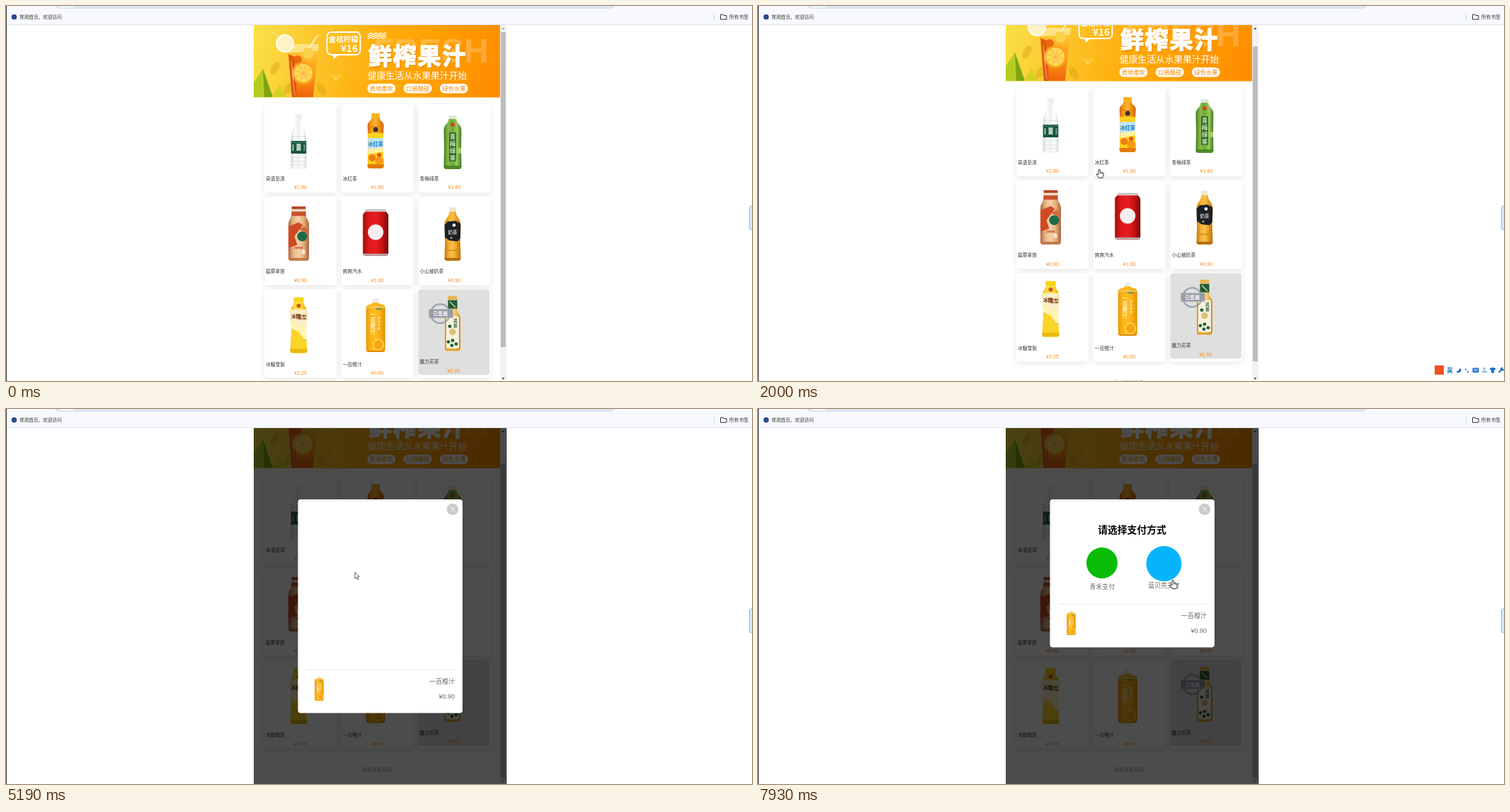
An HTML page with a canvas for the animation above (8000 ms loop, 1054 px wide and 531 px high).

```html
<!DOCTYPE html>
<html lang="zh">
<head>
<meta charset="utf-8">
<title>Drinks shop</title>
<style>
html, body { margin: 0; width: 100%; height: 100%; overflow: hidden; background: #fff; }
canvas { display: block; width: 1054px; height: 531px; }
</style>
</head>
<body>
<canvas id="c"></canvas>
<script>
const W = 1054, H = 531, LOOP = 8000;
const CJK = '"Noto Sans CJK SC", "Noto Sans CJK", sans-serif';
const LATIN = '"Liberation Sans", Arial, sans-serif';
const cv = document.getElementById('c'), g = cv.getContext('2d');
const dpr = window.devicePixelRatio || 1;
cv.width = W * dpr;
cv.height = H * dpr;

// ---- helpers
function rect(x, y, w, h, color, r = 0) {
  g.fillStyle = color;
  g.beginPath();
  g.roundRect(x, y, w, h, r);
  g.fill();
}
function disc(x, y, r, color) {
  g.fillStyle = color;
  g.beginPath();
  g.arc(x, y, r, 0, 7);
  g.fill();
}
function poly(points, fill, stroke, lw = 1) {
  g.beginPath();
  for (let i = 0; i < points.length; i += 2) g.lineTo(points[i], points[i + 1]);
  g.closePath();
  if (fill) { g.fillStyle = fill; g.fill(); }
  if (stroke) { g.strokeStyle = stroke; g.lineWidth = lw; g.stroke(); }
}
function line(x1, y1, x2, y2, color, lw = 1) {
  g.strokeStyle = color;
  g.lineWidth = lw;
  g.beginPath();
  g.moveTo(x1, y1);
  g.lineTo(x2, y2);
  g.stroke();
}
function text(s, x, y, size, color, align = 'left', weight = 400, font = CJK) {
  g.font = `${weight} ${size}px ${font}`;
  g.textAlign = align;
  g.textBaseline = 'middle';
  g.fillStyle = color;
  g.fillText(s, x, y);
}
function column(s, x, y, size, color, step = size) {
  [...s].forEach((ch, i) => text(ch, x, y + i * step, size, color, 'center', 700));
}
function blend(x1, y1, x2, y2, colors) {
  const gr = g.createLinearGradient(x1, y1, x2, y2);
  colors.forEach((c, i) => gr.addColorStop(i / (colors.length - 1), c));
  return gr;
}
function track(keys, t) {
  if (t <= keys[0][0]) return keys[0].slice(1);
  for (let i = 1; i < keys.length; i++) {
    const a = keys[i - 1], b = keys[i];
    if (t < b[0]) {
      const u = (t - a[0]) / (b[0] - a[0]), e = u * u * (3 - 2 * u);
      return a.slice(1).map((v, k) => v + (b[k + 1] - v) * e);
    }
  }
  return keys[keys.length - 1].slice(1);
}

// ---- drinks, each drawn around x = 0 with y = 0 at the card top
// cw, ch: cap size; neck: straight part; sh: shoulder height; waist: inward bend of the sides
function bottle(o, art) {
  const { y, w, h, cw, ch, neck = 0, sh, waist = 0 } = o;
  const a = w / 2, n = cw / 2, cap = y + ch, top = cap + neck, end = y + h;
  const mid = (top + sh + end - 4) / 2, foot = Math.min(4, a / 2);
  g.save();
  g.beginPath();
  g.moveTo(-n, cap);
  g.lineTo(-n, top);
  g.bezierCurveTo(-n, top + sh * .4, -a, top + sh * .5, -a, top + sh);
  g.quadraticCurveTo(-a + waist * 2, mid, -a, end - foot);
  g.quadraticCurveTo(-a, end, -a + foot, end);
  g.lineTo(a - foot, end);
  g.quadraticCurveTo(a, end, a, end - foot);
  g.quadraticCurveTo(a - waist * 2, mid, a, top + sh);
  g.bezierCurveTo(a, top + sh * .5, n, top + sh * .4, n, top);
  g.lineTo(n, cap);
  g.closePath();
  g.fillStyle = blend(-a, 0, a, 0, o.fill);
  g.fill();
  g.clip();
  art(a, end);
  g.restore();
  rect(-n, y, cw, ch, o.cap, 1);
}
function water() {
  bottle({ y: 15, w: 22, h: 77, cw: 9, ch: 6, sh: 32, cap: '#eceeef',
    fill: ['#d4d8d9', '#fbfbfb', '#eff1f1', '#fff', '#d6d9da'] }, a => {
    rect(-a, 52, 22, 18, '#17573d');
    line(-a, 54, a, 54, '#4c8a6c');
    rect(-3, 56, 6, 10, '#b9cdc2');
    line(-8, 57, -8, 66, '#a4bfb1', 2);
    line(8, 57, 8, 66, '#6f9c87', 2);
    for (const y of [46, 75, 81, 86]) line(-a, y, a, y, '#dadddd');
  });
}
function icedTea() {
  bottle({ y: 13, w: 23, h: 78, cw: 12, ch: 7, sh: 10, waist: 1, cap: '#f7b01f',
    fill: ['#d26a08', '#f49d1e', '#fbb632', '#ee8e10', '#cc6506'] }, (a, end) => {
    line(-a, 32, a, 32, '#d97a0c');
    rect(-a, 41, 23, 50, '#ffd21f');
    rect(-a, 48, 23, 17, '#bfe4f4');
    disc(0, 36, 3.5, '#3b3422');
    text('冰红茶', 0, 56, 7.2, '#1277cc', 'center', 900);
    poly([-a, 64, a, 61, a, 67, -a, 71], '#fff2a0');
    disc(-5, 76, 5, '#f07b12');
    disc(5, 80, 6, '#f59a16');
    disc(5, 72, 3, '#e4571c');
    rect(-a, end - 6, 23, 6, '#e07a0a');
  });
}
function greenTea() {
  bottle({ y: 16, w: 25, h: 76, cw: 11, ch: 5, sh: 16, waist: .5, cap: '#dfe8d2',
    fill: ['#437f22', '#86bb49', '#6eaa3a', '#9bca5a', '#3d7620'] }, (a, end) => {
    disc(0, 29, 3, '#d2452c');
    rect(-5, 40, 10, 41, '#2e6b3b', 1);
    column('青梅绿茶', 0, 46, 8.2, '#d9eab4', 9.8);
    rect(-a, end - 5, 25, 5, '#4c8a26');
    disc(9, 66, 4, '#a8cf5e');
  });
}
function coffee() {
  bottle({ y: 13.5, w: 29, h: 77, cw: 20, ch: 4, neck: 7, sh: 15, cap: '#b5482a',
    fill: ['#b0683a', '#e9b98c', '#f4d0a8', '#e5ae7c', '#aa6236'] }, (a, end) => {
    rect(-a, 17, 29, 3, '#f3e6da');
    rect(-a, 21, 29, 6, '#c8502c');
    poly([-a, 42, 0, 36, 6, 40, -6, 56, -2, 68, -a, 72], '#cf4a22');
    poly([0, 46, 8, 42, a, 48, a, 52], '#d8663a');
    disc(5, 56, 7, '#1d6b49');
    text('latte', 0, 72, 6, '#c23e1c', 'center', 700, LATIN);
    rect(4, 75, 5, 6, '#f6e7d8');
    rect(-a, end - 4, 29, 4, '#c07a48');
  });
}
function can() {
  bottle({ y: 17.5, w: 36, h: 66, cw: 29, ch: 2, sh: 7, cap: '#bcbcbc',
    fill: ['#a80d0e', '#df191b', '#e61e1e', '#c81214', '#7d080a'] }, (a, end) => {
    rect(-a, 19, 36, 2, '#dcd4d2');
    disc(0, 50, 11, '#f8eeee');
    rect(-a, end - 3, 36, 3, '#b3acab');
  });
}
function milkTea() {
  bottle({ y: 14.5, w: 23, h: 76, cw: 9, ch: 6, sh: 20, waist: .8, cap: '#f0e6d2',
    fill: ['#c17a10', '#f2ae2d', '#f8c04a', '#e89c1c', '#b86f0a'] }, (a, end) => {
    poly([-a, 40, -7, 35, 4, 34, a, 38, a, 58, 7, 63, -4, 62, -a, 57], '#1b2127');
    disc(2, 40, 2.4, '#e8e8e2');
    text('奶茶', 0, 50, 6.5, '#c9c6ba', 'center', 700);
    disc(-2, 58, 1.5, '#c7a440');
    line(-a, 76, a, 76, '#d2881a', 1.5);
    rect(-a, end - 4, 23, 4, '#b56c0d');
  });
}
function pear() {
  bottle({ y: 11, w: 24, h: 79, cw: 14, ch: 7, sh: 14, waist: 1.5, cap: '#f6d512',
    fill: ['#e3b010', '#fcd92f', '#ffe450', '#f9ce1d', '#dfa80a'] }, (a, end) => {
    rect(-a, 28, 24, 26, '#f9efc4');
    disc(0, 23, 3, '#d4532a');
    text('冰糖', -4, 38, 6.5, '#6a2713', 'center', 900);
    text('雪梨', 5, 39, 6.5, '#8a3a18', 'center', 900);
    poly([-a, 46, a, 54, a, 72, -a, 60], '#fff3b4');
    poly([-a, 54, 0, 60, a, 76, a, end, -a, end], '#fbd42a');
    rect(-a, end - 6, 24, 6, '#eab90f');
  });
}
function orange() {
  bottle({ y: 12.5, w: 27, h: 76, cw: 8, ch: 6, sh: 6, cap: '#ecebe6',
    fill: ['#e89808', '#fdb416', '#ffbd24', '#fbab10', '#e49006'] }, (a, end) => {
    rect(-a, 24, 27, 2, '#f9cc62');
    rect(0, 26, 9, 3, '#8f9a48', 1);
    column('一百橙汁', -4, 36, 7.5, '#fff3cf', 8);
    column('鲜果鲜榨', 5, 40, 3.5, '#fff3cf', 5);
    disc(4, 78, 8, '#ffd557');
    disc(4, 78, 6.5, '#f9a412');
    rect(-a, end - 2, 27, 2, '#e08c06');
  });
}
function flowerTea() {
  bottle({ y: 9, w: 22, h: 78, cw: 13, ch: 5, neck: 15, sh: 12, cap: '#e8b64a',
    fill: ['#d0922a', '#f4cd6c', '#f9dc8c', '#eebe52', '#c98620'] }, (a, end) => {
    rect(-a, 15, 22, 12, '#215a3a');
    line(-4, 17, 4, 25, '#b5cfa5', 1.5);
    rect(-9, 38, 18, 45, '#f6f0da');
    column('花茶', 4, 44, 6, '#28573b', 7);
    disc(-4, 52, 2.4, '#1f5c3b');
    disc(0, 60, 4.5, '#d9c070');
    for (const [x, y] of [[-6, 74], [0, 72], [5, 77], [-1, 79]]) disc(x, y, 2.4, '#23603a');
    rect(-a, end - 3, 22, 3, '#dfa030');
  });
}

const GOODS = [
  ['泉语至清', '1.80', water], ['冰红茶', '1.80', icedTea], ['青梅绿茶', '1.80', greenTea],
  ['晨雾拿铁', '0.90', coffee], ['爽爽汽水', '1.80', can], ['小山坡奶茶', '0.90', milkTea],
  ['冰糖雪梨', '2.25', pear], ['一百橙汁', '0.90', orange], ['魔力花茶', '0.90', flowerTea]
];

// ---- page parts
function chrome() {
  rect(0, 0, W, H, '#fff');
  rect(0, 0, W, 27, '#f7f9fe');
  rect(69, -12, 791, 16, '#dfe6f1', 7);
  rect(75, -8, 22, 10, '#fafbfe', 4);
  line(0, 26.5, W, 26.5, '#dde2ea');
  line(.5, 0, .5, H, '#333');
  disc(11.5, 15.5, 3.8, '#2c4a8c');
  text('常用首页，欢迎访问', 19, 15.5, 6.67, '#333');
  line(1000.5, 11, 1000.5, 20, '#c5d3ea');
  poly([1009.5, 12, 1013, 12, 1014, 13.5, 1018, 13.5, 1018, 19, 1009.5, 19], null, '#333');
  text('所有书签', 1022, 15.5, 6.75, '#333');
  rect(1050.5, 283, 10, 34, '#d7e9fd', 3);
  g.strokeStyle = '#7db4ee';
  g.lineWidth = 1;
  g.stroke();
}

function title(x, y, color) {
  g.letterSpacing = '1.8px';
  g.lineJoin = 'miter';
  g.strokeStyle = color;
  g.lineWidth = 1.4;
  text('鲜榨果汁', x, y, 33, color, 'left', 900);
  g.strokeText('鲜榨果汁', x, y);
  g.letterSpacing = '0px';
}

function banner() {
  g.save();
  g.beginPath();
  g.rect(350, 27, 348, 102.5);
  g.clip();
  rect(350, 27, 348, 103, blend(350, 30, 698, 110, ['#f8e24a', '#fcc62a', '#ffae0c', '#ff9d00', '#ff8c00']));
  poly([350, 129, 350, 108, 363, 89, 377, 129], '#b4cc22');
  poly([363, 89, 377, 129, 365, 129], '#7fa312');
  poly([375, 129, 386, 111, 396, 129], '#d8cf22');
  g.fillStyle = 'rgba(214,160,20,.45)';
  for (const [x, y, r] of [[399, 117, .6], [446, 118, -.6], [380, 88, .5]]) {
    g.beginPath();
    g.ellipse(x, y, 5, 10, r, 0, 7);
    g.fill();
  }
  for (const x of [460, 466, 472])
    line(466, 106, x, 97, '#ffdc7a', 1.2);
  line(374, 35, 388, 45, '#fff0a0', 1);
  // glass of juice
  line(419, 72, 441, 41, '#f7f0d0', 2);
  poly([398, 54, 442, 54, 434, 129, 404, 129], 'rgba(255,244,190,.6)');
  poly([399, 66, 441, 64, 434, 129, 404, 129], blend(0, 64, 0, 129, ['#ffc636', '#fb9a14', '#f0640c']));
  poly([399, 68, 408, 72, 411, 129, 404, 129], '#e4560e');
  disc(394, 53, 13, '#fffbe8');
  disc(394, 53, 10.5, '#fdf3c4');
  disc(427, 67, 8, '#fbd04a');
  disc(412, 76, 6, '#ea6a10');
  disc(420, 95, 16, '#f7a416');
  disc(420, 95, 13, '#ffd658');
  for (let i = 0; i < 4; i++) {
    const a = i * Math.PI / 4 + .3, dx = Math.cos(a) * 12, dy = Math.sin(a) * 12;
    line(420 - dx, 95 - dy, 420 + dx, 95 + dy, '#f8b234', 1);
  }
  line(403, 78, 408, 127, 'rgba(255,255,255,.35)', 1.5);
  // price bubble
  g.strokeStyle = '#fff';
  g.lineWidth = 1.8;
  g.beginPath();
  g.roundRect(453.5, 37, 47, 32, 6);
  g.stroke();
  poly([462, 69, 463, 75, 470, 69], '#fff');
  text('金桔柠檬', 477, 47, 10.6, '#fff', 'center', 900);
  text('¥16', 497, 60, 13.5, '#fff', 'right', 900);
  // waves
  g.strokeStyle = '#fff';
  g.lineWidth = 1.3;
  for (let y = 39; y < 47; y += 3) {
    g.beginPath();
    for (let x = 511; x <= 537; x++) g.lineTo(x, y + Math.sin((x - 511) * .95));
    g.stroke();
  }
  text('FRESH', 519, 67, 48, 'rgba(255,255,255,.22)', 'left', 700, LATIN);
  title(513.5, 72, '#ee9208');
  title(512, 70.5, '#fff');
  text('健康生活从水果果汁开始', 511, 98, 12.75, '#fff');
  ['质地柔软', '口感酸甜', '绿色水果'].forEach((s, i) => {
    const x = 510.5 + i * 51.2;
    rect(x, 110, 40, 13.5, '#fff', 6.7);
    text(s, x + 20, 116.8, 8.3, '#f58a08', 'center');
  });
  g.restore();
}

function stamp(x, y) {
  g.strokeStyle = 'rgba(140,146,156,.8)';
  g.lineWidth = 2.2;
  g.beginPath();
  g.arc(x, y, 13.5, 0, 7);
  g.stroke();
  rect(x - 16, y - 6, 34, 12, '#979ca6', 1);
  text('已售罄', x + .5, y, 7, '#fff', 'center', 700);
}

function card([name, price, draw], i) {
  const x = 365 + (i % 3) * 108.75, y = 139 + Math.floor(i / 3) * 131.3, sold = i === 8;
  g.save();
  g.shadowColor = 'rgba(0,0,0,.1)';
  g.shadowBlur = 9 * dpr;
  g.shadowOffsetY = 2 * dpr;
  rect(x, y, 102, 125, '#fff', 4);
  g.restore();
  if (sold) rect(x, y, 100.5, 121, '#dfdfde', 4);
  g.save();
  g.translate(x + 48.5, y);
  draw();
  g.restore();
  if (sold) stamp(x + 31, y + 34);
  const up = sold ? 3.5 : 0;
  text(name, x + 2, y + 105.5 - up, 6.75, '#333');
  text('¥' + price, x + 51 - up / 3, y + 118.5 - up, 7.2, '#ff8a1f', 'center', 400, LATIN);
}

function page(s) {
  g.save();
  g.beginPath();
  g.rect(350, 27, 348, 504);
  g.clip();
  g.translate(0, -s);
  banner();
  GOODS.forEach(card);
  text('-- 没有更多商品 --', 524, 556, 7.15, '#999', 'center');
  g.restore();
  rect(698, 27, 9, 504, '#f2f2f2');
  rect(699, 37 + s * .88, 7, 446, '#bdbdbd');
  poly([700.5, 33, 702.5, 30.5, 704.5, 33], s > 0 ? '#333' : '#999');
  poly([700.5, 526.5, 702.5, 529, 704.5, 526.5], s < 45.5 ? '#333' : '#999');
}

function inputBar() {
  const blue = '#1a6fd0', y = 515.5;
  rect(956, y - 6.5, 13, 13, '#f1531f');
  text('英', 977.5, y, 8.5, blue, 'center', 700);
  g.fillStyle = blue;
  g.beginPath();
  g.arc(989.5, y, 3.8, -.9, 2.5);
  g.quadraticCurveTo(991, y + 1, 991.9, y - 3);
  g.fill();
  disc(1000, y - 1, 1.1, blue);
  line(1003.5, y + 1, 1002.5, y + 3.5, blue, 1.4);
  rect(1009.5, y - 3, 9, 6.5, blue, 1);
  for (const dy of [-1, 1]) line(1011, y + dy, 1017, y + dy, '#fff', .7);
  disc(1026, y - 2, 1.7, '#8cb4e0');
  rect(1023, y + 1, 7, 2.5, '#8cb4e0', 1);
  poly([1034, 513, 1036, 512, 1040, 512, 1042, 513, 1042, 515, 1040, 515.5, 1040, 519.5, 1036, 519.5, 1036, 515.5, 1034, 515], blue);
  line(1046.5, 519, 1050, 515.5, blue, 2);
  disc(1051.5, 514, 2.6, blue);
  disc(1053, 512.8, 1.3, '#fff');
}

function dialog(qr) {
  const dy = qr ? 93 : 0;
  rect(350, 27, 357.5, 504, 'rgba(0,0,0,.7)');
  rect(412.5, 128, 232.5, 209.4 + dy, '#fff', 4);
  disc(631, 142, 8.3, '#c9cac9');
  text('X', 631, 142.5, 9, '#fff', 'center', 400, LATIN);
  if (!qr) {
    text('请选择支付方式', 528.5, 170.5, 13.8, '#000', 'center', 700);
    disc(486, 218, 22, '#0abb07');
    disc(573.5, 219, 25, '#06b4fd');
    text('青禾支付', 486.3, 251.5, 8.9, '#666', 'center');
    text('蓝贝壳支付', 573.5, 250, 8.9, '#666', 'center');
  }
  line(424, 276.5 + dy, 635, 276.5 + dy, '#e8e8e8');
  g.save();
  g.translate(442.5, 279.3 + dy);
  g.scale(.46, .46);
  orange();
  g.restore();
  text('一百橙汁', 634, 293 + dy, 9, '#666', 'right');
  text('¥0.90', 634, 315 + dy, 9, '#666', 'right', 400, LATIN);
}

function pointer(x, y, hand) {
  g.save();
  g.translate(x, y);
  g.lineJoin = 'round';
  if (hand) {
    poly([-1, 1, 0, 0, 1.2, 1, 1.4, 4.5, 3, 4.6, 4.4, 5, 6, 5.8, 6.3, 8, 5.2, 10.5, 5, 12.5,
      -.6, 12.5, -1.5, 10.5, -3.8, 7.8, -3.4, 6.6, -2.2, 6.8, -1, 8], '#fff', '#222', .9);
    for (const dx of [1.4, 3.1, 4.6]) line(dx, 5, dx, 7, '#444', .6);
  } else {
    poly([0, 0, 0, 9.2, 2, 7.3, 3.5, 10.6, 4.9, 10, 3.5, 6.8, 6.3, 6.6], '#fff', '#222', .7);
  }
  g.restore();
}

// ---- timeline: [ms, values...]
const SCROLL = [[560, 0], [990, 45.5], [1389, 45.5], [1390, 39], [1600, 0],
  [1929, 0], [1930, 9], [2000, 23], [2210, 45.5]];
const MOUSE = [[70, 690, 300], [560, 484, 230], [1930, 484, 230], [2000, 482, 231], [2410, 482, 231],
  [2960, 607, 390], [3100, 607, 390], [3160, 608, 390], [3440, 608, 390], [3910, 505, 399],
  [4300, 505, 399], [4920, 493, 222], [4990, 493, 222], [5390, 493, 240], [5590, 493, 240],
  [5800, 568, 242], [6290, 629, 143], [6420, 629, 143], [7180, 505, 399], [7310, 505, 399], [7930, 586, 242]];

function draw(t) {
  const open = (t >= 4170 && t < 6420) || t >= 7310;
  const qr = t >= 4990 && t < 6420;
  const [x, y] = track(MOUSE, t);
  const onPay = !qr && y > 194 && y < 256 && (Math.abs(x - 486) < 24 || Math.abs(x - 573) < 25);
  const hand = !open || onPay || Math.hypot(x - 631, y - 142) < 9;
  g.setTransform(dpr, 0, 0, dpr, 0, 0);
  chrome();
  page(track(SCROLL, t)[0]);
  if (t >= 130 && t < 3130) inputBar();
  if (open) dialog(qr);
  if (t >= 70) pointer(x, y, hand);
}

const start = performance.now();
function tick() {
  draw((performance.now() - start) % LOOP);
  requestAnimationFrame(tick);
}
tick();
</script>
</body>
</html>
```
